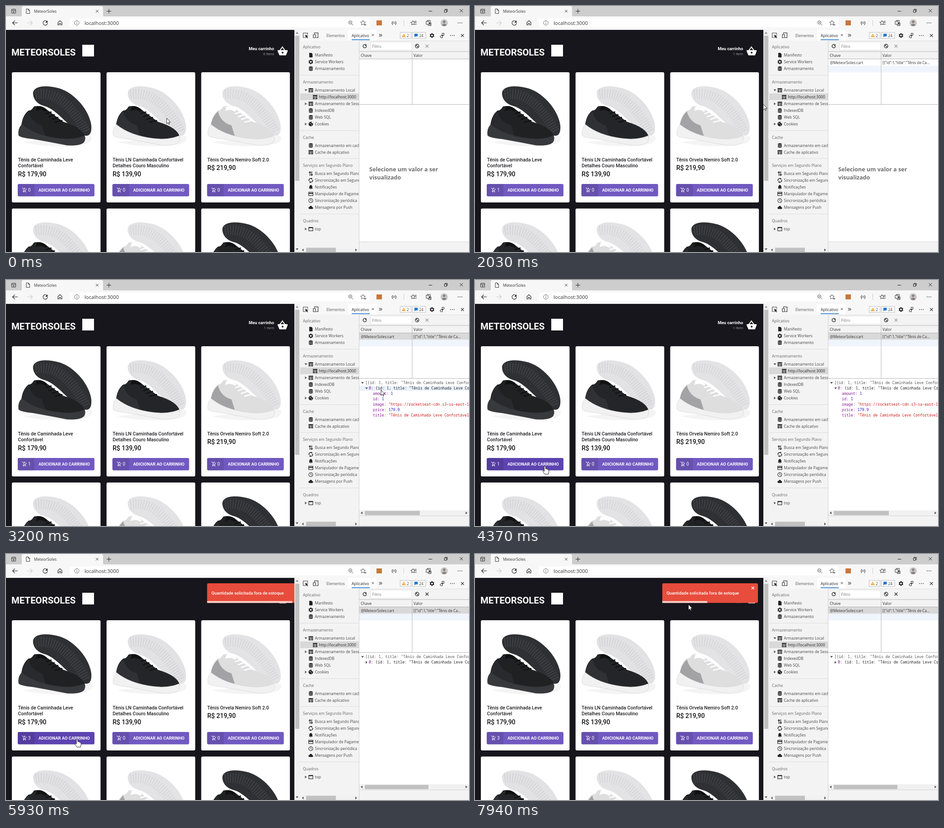
Animation of 1026x546 px, one loop 8 s. Source, as an HTML page:

```html
<!DOCTYPE html>
<html lang="pt-BR">
<head>
<meta charset="utf-8">
<title>MeteorSoles</title>
<style>
html, body { margin: 0; width: 100%; height: 100%; overflow: hidden; background: #fff; }
#stage { display: block; width: 100%; height: 100%; }
text { font-family: "Open Sans", "Noto Sans", sans-serif; white-space: pre; }
.ro { font-family: Roboto, Arial, sans-serif; }
.md { font-weight: 500; }
.bd { font-weight: 700; }
.mono { font-family: "Noto Sans Mono", "DejaVu Sans Mono", monospace; }
</style>
</head>
<body>
<svg id="stage" viewBox="0 0 1026 546" preserveAspectRatio="none"></svg>
<script>
const $ = id => document.getElementById(id);
const R = (x, y, w, h, fill, more = '') => `<rect x="${x}" y="${y}" width="${w}" height="${h}" fill="${fill}" ${more}/>`;
const T = (x, y, s, size = 8.5, fill = '#444', more = '') => `<text x="${x}" y="${y}" font-size="${size}" fill="${fill}" ${more}>${s}</text>`;
const F = (d, fill = '#222') => `<path d="${d}" fill="${fill}"/>`;
const L = (d, color = '#333', w = 1, more = '') => `<path d="${d}" fill="none" stroke="${color}" stroke-width="${w}" ${more}/>`;
const C = (x, y, r, fill, more = '') => `<circle cx="${x}" cy="${y}" r="${r}" fill="${fill}" ${more}/>`;
const G = (x, y, s, more = '') => `<g transform="translate(${x} ${y})" ${more}>${s}</g>`;
const cross = (x, y, r, color, w = 1) => L(`M${x - r} ${y - r}l${2 * r} ${2 * r}m0 ${-2 * r}l${-2 * r} ${2 * r}`, color, w);
const dots = (x, y) => [-4, 0, 4].map(d => C(x + d, y, .9, '#333')).join('');
const reload = (x, y, r, w) => G(x, y, L(`M${r * .7} ${-r * .7}A${r} ${r} 0 1 0 ${r} 0`, '#222', w) + F(`M${r} ${-r * 1.1}v${r}h${-r}z`));
const tri = (x, y, dir, color = '#555') => F({
  r: `M${x - 2} ${y - 3}v6l4 -3z`, l: `M${x + 2} ${y - 3}v6l-4 -3z`,
  d: `M${x - 3} ${y - 2}h6l-3 4z`, u: `M${x - 3} ${y + 2}h6l-3 -4z`
}[dir], color);

// Icons drawn around 0,0
const gear = C(0, 0, 3.1, 'none', 'stroke="#222" stroke-width="2.2"') +
  L('M0 -5.2V-3.5M0 3.5V5.2M-4.5 -2.6L-3 -1.7M3 1.7L4.5 2.6M-4.5 2.6L-3 1.7M3 -1.7L4.5 -2.6', '#222', 2);
const icons = {
  file: F('M-3.5 -5H1.2L3.8 -2.4V5H-3.5z'),
  gear,
  db: F('M-4.5 -3.5Q0 -6.5 4.5 -3.5V3.5Q0 6.5 -4.5 3.5z') + L('M-4.5 -1.8Q0 .2 4.5 -1.8M-4.5 1.5Q0 3.5 4.5 1.5', '#f3f3f3'),
  grid: R(-5, -4.5, 10, 9, '#222') + L('M-5 -1.4H5M-5 1.7H5M0 -1.4V4.5', '#f3f3f3'),
  cookie: C(0, 0, 5, '#222') + C(-1.5, -1.5, 1, '#f3f3f3') + C(1.5, 2, .9, '#f3f3f3') + C(3, -3, 1.6, '#f3f3f3'),
  swap: L('M-2 5V-4M2 -5V4M-4.3 -1.8L-2 -4.2L.3 -1.8M-.3 1.8L2 4.2L4.3 1.8', '#222', 1.3),
  sync: L('M-3.8 1.5A4 4 0 0 1 1.5 -3.8M3.8 -1.5A4 4 0 0 1 -1.5 3.8', '#222', 1.5) + F('M1 -6v4.4l2.6 -2.2zM-1 6v-4.4l-2.6 2.2z'),
  bell: F('M-4.5 3.2L-3.3 1.8V-1Q-3 -4.2 0 -4.7Q3 -4.2 3.3 -1V1.8L4.5 3.2zM-1.3 4h2.6q-1.3 2 -2.6 0z'),
  card: R(-4.7, -3.7, 9.4, 7.4, 'none', 'stroke="#222" stroke-width="1.2"') + R(-4.7, -2, 9.4, 2, '#222'),
  clock: C(0, 0, 4.5, 'none', 'stroke="#222" stroke-width="1.1"') + L('M0 -3V.3L2 1.6', '#222'),
  cloud: F('M-3 3.5Q-5.5 3 -5.3 .8Q-4.8 -1 -3 -1Q-1.8 -4 1 -3.3Q3 -2.7 3.2 -.6Q5.6 -.2 5.3 1.8Q4.9 3.4 3 3.5z'),
  frame: R(-4.5, -3.7, 9, 7.6, 'none', 'stroke="#222" stroke-width="1.2"') + R(-4.5, -4, 9, 2, '#222')
};

function browser() {
  return R(0, 0, 1026, 24, '#cdcdcd') + R(0, 23, 1026, 30, '#f7f7f7') +
    F('M31 24Q35 24 35 20V4Q35 0 39 0H211Q215 0 215 4V20Q215 24 219 24z', '#f7f7f7') +
    R(12.5, 7, 9, 9, 'none', 'stroke="#333" rx="1"') + L('M12.5 9.5h9M15.5 13h4m-2 -1.6l-2 1.6l2 1.6') +
    L('M45 6.5h4.5l3 3v7h-7.5zM49.5 6.5v3h3') + T(62, 15, 'MeteorSoles', 8.6, '#333') +
    cross(202, 11.5, 2.8, '#333') + L('M223 11.5h10M228 6.5v10', '#222') +
    L('M936.5 11.5h8', '#222') + L('M971.5 9h5v5h-5zM973 9v-1.8h5v5h-1.5', '#222') + cross(1009, 10.5, 3.5, '#222') +
    L('M26 37.5H15M19.5 32.5l-5 5l5 5', '#222', 1.1) + L('M47 37.5h11M53.5 32.5l5 5l-5 5', '#ccc', 1.1) +
    reload(87, 37.5, 5, 1.1) + L('M115 36.8V42h3v-3.5h3V42h3v-5.2l-4.5 -4.3z', '#222', 1.1) +
    R(141, 27.5, 665, 20, '#fff', 'rx="3"') +
    C(157, 37.5, 5, 'none', 'stroke="#555" stroke-width=".9"') + L('M157 36.5v3.5M157 34.3v1.2', '#555') +
    T(174, 41.7, 'localhost:3000', 11.3, '#333') +
    C(763, 36.5, 3.7, 'none', 'stroke="#555"') + L('M766 39.5l3.5 3.5M761 36.5h4', '#555') +
    L('M791 32l1.6 3.4l3.8 .5l-2.8 2.5l.6 3.8l-3.2 -1.9l-3.3 1.9l.6 -3.8l-2.7 -2.5l3.8 -.5zM796 39v5M793.5 41.5h5', '#555') +
    R(821, 32, 12, 11, '#c9763a') + T(860, 40, '{≡}', 8, '#333', 'text-anchor="middle" class="bd"') +
    L('M881.5 31v13', '#ccc') +
    L('M902 32.5l1.5 3.2l3.5 .4l-2.6 2.3l.5 3.4l-3 -1.7l-3 1.7l.5 -3.4l-2.6 -2.3l3.6 -.4zM905 34h5M907 37h3M906 40.5h4') +
    L('M931 34h6.5v6.5H931zM933.5 34v-2h6.8v6.5h-2.8M937 37.5h5v6h-6.5v-3M939.3 38.5v4M937.3 40.5h4') +
    C(971, 37.5, 8, '#c9c6c5') + C(971, 35, 2.8, '#858080') + F('M965.8 42.5q5.2 -6.6 10.4 0q-5.2 4 -10.4 0z', '#858080') + dots(1006, 37.5);
}

const looks = [
  { back: '#2f3033', tread: '#444548', body: '#202123', sole: '#38393c', patch: '#292a2d', lace: '#111', edge: '#38393c' },
  { back: '#e2e2e4', tread: '#d2d2d5', body: '#242528', sole: '#f1f1f2', patch: '#303135', lace: '#111', edge: '#cfcfd2' },
  { back: '#e3e3e5', tread: '#d4d4d7', body: '#dededf', sole: '#f1f1f2', patch: '#a3a3a5', lace: '#fff', edge: '#d2d2d5' }
];
function shoe(k) {
  const c = looks[k];
  return F('M36 302Q100 318 178 306Q196 298 188 288z', '#f4f4f4') +
    F('M60 196C58 177 88 174 119 183C153 194 185 232 189 265C191 289 180 292 165 284C139 268 112 229 85 222C70 218 61 208 60 196z', c.back) +
    L('M66 196Q106 190 137 222Q163 249 177 280', c.tread, 22, 'stroke-dasharray="1.6 4"') +
    F('M34 266Q36 243 50 232Q56 233 62 223Q79 219 92 231L127 257Q170 270 175 290Q150 305 100 296Z', c.body) +
    F('M34 266Q37 246 50 234Q56 258 80 265L88 290Q50 290 34 266z', c.patch) +
    F('M69 223Q80 220 91 231L88 235Q78 227 66 233z', c.lace) +
    L('M88 239l13 -4M94 246l14 -5M101 252l15 -5M108 258l17 -4', c.lace, 2.6) +
    F('M35 263Q26 272 28 287Q31 292 60 295Q100 302 135 309Q165 311 173 302Q177 294 174 288Q150 298 118 294Q65 288 35 263z" stroke="' + c.edge + '" stroke-width=".7', c.sole);
}

const trolley = L('M-4.5 -4h2l2.4 5.3h3.6l2 -3.8M-1.2 1.3l-1 2h6', '#fff') + C(-1.2, 4.6, .9, '#fff') + C(3.4, 4.6, .9, '#fff') + L('M1.3 -4.8v3.6m-1.8 -1.8h3.6', '#fff', .9);
const products = [
  [['Tênis de Caminhada Leve', 'Confortável'], '179,90'],
  [['Tênis LN Caminhada Confortável', 'Detalhes Couro Masculino'], '139,90'],
  [['Tênis Orvela Nemiro Soft 2.0'], '219,90']
];
function card([lines, price], i) {
  return G(i * 209.8, 0, R(13, 147, 196.5, 289, '#fff', 'rx="3"') + shoe(i) +
    lines.map((s, n) => T(26.5, 344.5 + n * 13.5, s, 10.65, '#202024', 'class="ro md"')).join('') +
    T(26.5, 364 + (lines.length - 1) * 13.5, 'R$ ' + price, 14, '#111', 'class="ro md"') +
    R(26, 395, 170, 27.5, '#7159c1', `rx="3" id="btn${i}"`) + F('M29 395h34v27.5h-34q-3 0 -3 -3v-21.5q0 -3 3 -3z', 'rgba(0,0,0,.1)') +
    G(40, 408, trolley) + T(49, 412.2, '0', 10, '#fff', `class="ro" id="count${i}"`) +
    T(72, 412, 'ADICIONAR AO CARRINHO', 9.4, '#fff', 'class="ro bd"'));
}

function shop() {
  return R(0, 53, 639, 493, '#17161c') +
    T(12, 110, 'METEORSOLES', 20.4, '#fff', 'class="ro bd"') + R(169, 86, 26, 26, '#fff') +
    T(594, 98, 'Meu carrinho', 9.4, '#fff', 'class="ro bd" text-anchor="end"') +
    T(594, 109, '', 8.1, '#999', 'class="ro" text-anchor="end" id="items"') +
    F('M602 98H624V100.5L620.5 109.5H606L602 100.5z', '#fff') + L('M607 98.5l5.5 -7.5l5.5 7.5', '#fff', 2) + C(613, 103.5, 2, '#17161c') +
    products.map(card).join('') +
    [1, 2, 0].map((k, i) => G(i * 209.8, 302, R(13, 147.5, 196.5, 200, '#fff', 'rx="3"') + shoe(k))).join('') +
    `<g id="toast">` + R(415, 65, 212, 43.5, '#e74c3c', 'rx="3"') +
    T(424.5, 89.5, 'Quantidade solicitada fora de estoque', 9.45, '#fff', 'class="ro md"') + cross(615.8, 75.5, 3, '#fff', 1.2) +
    R(415, 104.5, 212, 4, '#f8d4cf', 'id="bar"') + '</g>';
}

const sections = [[94, 'Aplicativo'], [172, 'Armazenamento'], [295, 'Cache'], [357, 'Serviços em Segundo Plano'], [480, 'Quadros']];
const entries = [
  [112, 'file', 'Manifesto'], [127, 'gear', 'Service Workers'], [142, 'db', 'Armazenamento'],
  [190, 'grid', 'Armazenamento Local', 'd'], [220, 'grid', 'Armazenamento de Sessão', 'r'],
  [235, 'db', 'IndexedDB'], [250, 'db', 'Web SQL'], [265, 'cookie', 'Cookies', 'r'],
  [312.5, 'db', 'Armazenamento em cache'], [327.5, 'grid', 'Cache de aplicativo'],
  [375, 'swap', 'Busca em Segundo Plano'], [390, 'sync', 'Sincronização em Segundo'], [405, 'bell', 'Notificações'],
  [420, 'card', 'Manipulador de Pagamento'], [435, 'clock', 'Sincronização periódica'], [450, 'cloud', 'Mensagens por Push'],
  [498, 'frame', 'top', 'r']
];
function sidebar() {
  return R(652, 77, 130, 469, '#f3f3f3') + R(652, 194, 130, 15, '#d9d9d9') +
    [153.5, 276.5, 338.5, 461.5].map(y => L(`M652 ${y}h130`, '#dcdcdc')).join('') +
    sections.map(([y, s]) => T(658, y, s, 8.6, '#666')).join('') +
    entries.map(([y, icon, s, arrow]) => G(675.5, y - 3, icons[icon]) + T(684.5, y, s) + (arrow ? tri(664.5, y - 3, arrow) : '')).join('') +
    G(685, 202, icons.grid) + T(693.5, 205, 'http://localhost:3000', 8.5, '#222') +
    R(652, 536, 130, 10, '#f1f1f1') + R(665, 536.5, 66, 9.5, '#c1c1c1') + tri(657.5, 541.5, 'l') + tri(776, 541.5, 'r');
}

const key = s => `<tspan fill="#881391">${s}</tspan>`;
const mono = (x, y, s, fill) => T(x, y, s, 8.25, fill, 'class="mono"');
const props = [['amount', '1'], ['id', '1'], ['image', '"https://rocketseat-cdn.s3-sa-east-1'], ['price', '179.9'], ['title', '"Tênis de Caminhada Leve Confortável"']];
function devtools() {
  return R(652, 53, 374, 24.5, '#f7f7f7') + R(758, 53, 63, 24, '#fff') + L('M652 77.5h374', '#ddd') +
    L('M663 70h-4.5v-10h10v4', '#333') + F('M663 64l7 2.8l-3 1.2l2.5 2.6l-1.2 1.1l-2.5 -2.6l-1.2 2.6z') +
    L('M683.5 62.5v-2.8h8v10.5h-4M681 63.5h5v7h-5z', '#333', 1.2) +
    T(710, 69, 'Elementos', 8.3, '#555') + T(766, 69, 'Aplicativo', 8.6, '#222') + R(766, 74, 40, 1.6, '#1a73c8') +
    cross(813, 64.5, 2.3, '#333') + L('M827 62l2.7 3l-2.7 3M830.3 62l2.7 3l-2.7 3', '#222', 1.1) +
    R(873.5, 58.5, 24, 13.5, '#fff', 'stroke="#bbb"') + F('M877 69l4.5 -8l4.5 8z', '#f0a63c') + L('M881.5 64v3', '#fff') + T(888, 68.7, '2') +
    R(900.5, 58.5, 29.5, 13.5, '#fff', 'stroke="#bbb"') + F('M905 61.5h7.5v6h-5l-2.5 2z', '#2277cc') + T(915.5, 68.7, '24') +
    G(944, 65.5, gear) + G(967, 65.5, L('M-2 -.5h5.5v-4.5h-4v4.5M2 .5h-5a2.3 2.3 0 0 0 0 4.5h3v-4', '#333', 1.1)) + dots(989, 65.5) + cross(1011.5, 65.5, 3.2, '#222', 1.2) +
    `<svg width="782" height="546">${sidebar()}</svg>` +
    R(782, 78, 244, 468, '#fff') + R(783, 78, 243, 39, '#f3f3f3') + R(808, 80, 91, 18, '#fff', 'stroke="#e0e0e0"') +
    reload(795, 89, 3.8, 1.3) + T(811.5, 92.5, 'Filtro', 8.5, '#777') +
    C(911, 89, 4, 'none', 'stroke="#222" stroke-width="1.3"') + L('M908.2 86.2l5.6 5.6', '#222', 1.3) +
    `<g id="clear" stroke="#999">${L('M929.8 85.8l6.4 6.4m0 -6.4l-6.4 6.4', 'inherit', 1.3)}</g>` +
    `<g id="row">` + R(783, 132.5, 243, 15, '#f0f5fd') + R(783, 117.5, 243, 15, '#d9d9d9', 'id="picked"') +
    T(786.5, 128.8, '@MeteorSoles:cart', 8.4, '#333') + T(903, 128.8, '[{"id":1,"title":"Tênis de Ca...', 8.2, '#333') + '</g>' +
    L('M783 101h243M783 117.5h243M783 218.5h243M900 101v117.5', '#b5b5b5') + L('M782.5 78V546', '#d0d0d0') +
    T(786, 112.8, 'Chave', 8.5, '#333') + T(903, 112.8, 'Valor', 8.5, '#333') +
    `<g id="empty">` + T(805, 367.3, 'Selecione um valor a ser', 12.6, '#6e6e6e', 'class="bd"') + T(805, 385.3, 'visualizado', 12.6, '#6e6e6e', 'class="bd"') + '</g>' +
    `<g id="preview">` + R(783, 235, 243, 11, '#ebf2fb', 'id="glow"') + tri(790, 228.5, 'd') +
    mono(796, 231.3, '[{id: 1, title: "Tênis de Caminhada Leve Confortável"', '#555') +
    `<g id="shut">${tri(799, 240.5, 'r')}</g>` +
    mono(804, 243.3, key('0') + ': {id: 1, title: "Tênis de Caminhada Leve Confortável"', '#222') +
    `<g id="open">` + tri(799, 240.5, 'd') +
    props.map(([k, v], i) => mono(813, 255.3 + i * 12, key(k) + ': ' + v, v[0] == '"' ? '#c41a16' : '#1c00cf')).join('') + '</g>' +
    R(783, 511, 243, 12, '#f1f1f1') + R(795, 512.5, 141, 9.5, '#c1c1c1', 'id="thumb"') + tri(788, 517, 'l') + tri(1020.5, 517, 'r') + '</g>' +
    R(783, 523, 243, 23, '#f3f3f3') + L('M783 523.5h243', '#d5d5d5');
}

$('stage').innerHTML = browser() + `<svg width="639" height="546">${shop()}</svg>` +
  R(639, 53, 13, 493, '#f1f1f1') + R(640.5, 66, 9.5, 322, '#c1c1c1') + tri(645, 59.5, 'u', '#888') + tri(645, 540, 'd') + devtools() +
  `<g id="pointer">` +
  `<path id="arrow" d="M0 0V12.4L2.9 9.7L4.8 13.8L6.6 13L4.8 9H8.6Z" fill="#fff" stroke="#111" stroke-width=".9"/>` +
  `<path id="hand" d="M-1.5 1.5Q-1.5 0 0 0Q1.5 0 1.5 1.5V6Q4 5.5 4.5 7Q6.5 6.5 7 8Q8.7 8 8.7 10V13L7.5 18H-.5L-4.5 12Q-5 9.5 -3 10L-1.5 11.5Z" fill="#fff" stroke="#111" stroke-width=".9"/></g>`;

// Time, x, y of the pointer
const path = [
  [0, 356, 249], [100, 356, 249], [940, 130, 401], [1020, 133, 404], [1480, 133, 404], [2350, 862, 136],
  [2490, 802, 128], [2590, 802, 128], [2960, 751, 248], [3130, 831, 244], [3680, 831, 244], [4290, 150, 419],
  [4370, 155, 413], [5860, 155, 413], [6630, 265, 311], [6710, 388, 219], [7240, 490, 90], [7800, 490, 90], [7940, 473, 112], [8000, 473, 112]
];
const smooth = u => u * u * (3 - 2 * u), easeOut = u => 1 - (1 - u) ** 3;
function along(keys, t, ease) {
  const i = keys.findIndex(k => k[0] > t);
  if (i < 1) return keys.at(i).slice(1);
  const a = keys[i - 1], b = keys[i], u = ease((t - a[0]) / (b[0] - a[0]));
  return a.slice(1).map((v, n) => v + (b[n + 1] - v) * u);
}
const bounce = [[5630, 2025], [6050, -17], [6155, 7], [6260, -3.4], [6330, 0]];
const show = (id, on) => $(id).setAttribute('visibility', on ? 'inherit' : 'hidden');
const set = (id, name, v) => $(id).setAttribute(name, v);

function draw(now) {
  const t = now % 8000;
  const [x, y] = along(path, t, smooth);
  const hover = x > 26 && x < 196 && y > 395 && y < 422.5;
  const open = t >= 3200 && t < 4610;
  set('pointer', 'transform', `translate(${x} ${y})`);
  show('arrow', !hover);
  show('hand', hover);
  set('btn0', 'fill', hover ? '#5d43b0' : '#7159c1');
  $('count0').textContent = [1410, 4610, 4930].filter(s => t >= s).length;
  $('items').textContent = t < 1410 ? '0 itens' : '1 item';
  show('row', t >= 1410);
  show('picked', t >= 2410);
  show('empty', t < 2410);
  show('preview', t >= 2410);
  show('glow', x > 783 && y > 235 && y < 246);
  show('open', open);
  show('shut', !open);
  set('thumb', 'width', open ? 122 : 141);
  set('clear', 'stroke', t < 4610 ? '#999' : '#222');
  show('toast', t >= 5630);
  set('toast', 'transform', `translate(${along(bounce, t, easeOut)[0]} 0)`);
  // The countdown rests while the pointer is over the notice
  const spent = Math.min(t, 7120) - 5600 + Math.max(0, t - 7870);
  set('bar', 'width', 212 * Math.min(1, Math.max(0, 1 - spent / 3000)));
}

let start;
function tick(now) {
  start ??= now;
  draw(now - start);
  requestAnimationFrame(tick);
}
draw(0);
requestAnimationFrame(tick);
</script>
</body>
</html>
```
